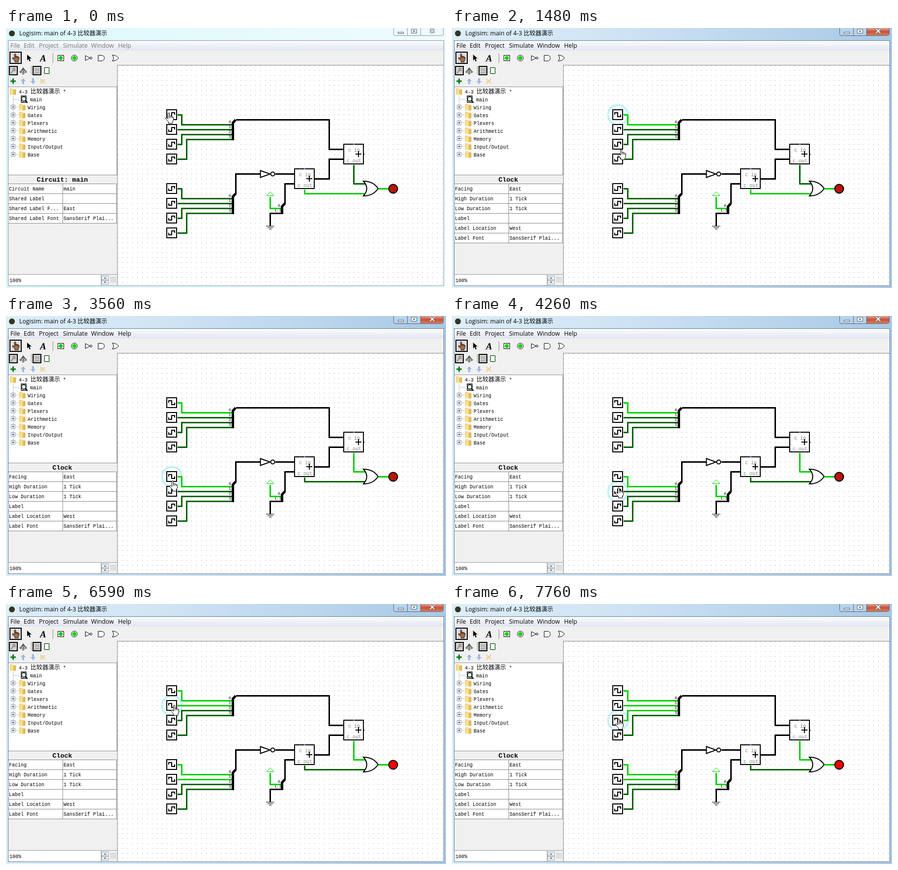
An HTML page for the animation above (8000 ms loop, 895 px wide and 528 px high).

```html
<!DOCTYPE html>
<html lang="zh">
<head>
<meta charset="utf-8">
<title>4-3 比较器演示</title>
<style>
  html, body { margin: 0; width: 100%; height: 100%; overflow: hidden; background: #f0f0f0; }
  svg { display: block; }
  text { white-space: pre; }
  .ui { font: 12.3px "Open Sans", "Noto Sans CJK SC", "Noto Sans CJK", sans-serif; }
  .cjk { font: 12px "Noto Sans CJK SC", "Noto Sans CJK", sans-serif; }
  .mono { font: 10px "Liberation Mono", monospace; }
  .head { font: bold 13.33px "Liberation Mono", monospace; text-anchor: middle; }
  .tiny { font: 8px "Liberation Mono", monospace; }
  .pin { font: 10px "Liberation Mono", monospace; fill: #808080; }
  .tool { font: italic bold 19px "Liberation Serif", serif; }
  .crisp { shape-rendering: crispEdges; }
  .line { fill: none; stroke: #000; }
</style>
</head>
<body>
<svg id="stage" width="895" height="528" viewBox="0 0 895 528"></svg>
<script>
const LOOP = 8000, ON = '#00d200', OFF = '#006400';

const text = (x, y, s, cls, fill = '#000') => `<text x="${x}" y="${y}" class="${cls}" fill="${fill}">${s}</text>`;
const rect = (x, y, w, h, fill, stroke = 'none', sw = 1) =>
  `<rect x="${x}" y="${y}" width="${w}" height="${h}" fill="${fill}" stroke="${stroke}" stroke-width="${sw}"/>`;
const path = (d, stroke = '#000', sw = 1, fill = 'none', extra = '') =>
  `<path d="${d}" stroke="${stroke}" stroke-width="${sw}" fill="${fill}" ${extra}/>`;
const crisp = s => `<g class="crisp">${s}</g>`;
const wire = (d, id = '', color = '#000') =>
  `<path d="${d}" class="crisp" transform="translate(.5 .5)" fill="none" stroke="${color}" stroke-width="3" ${id && `id="${id}"`}/>`;

const defs = `<defs>
  <linearGradient id="aeroOff"><stop stop-color="#dcf8fd"/><stop offset="1" stop-color="#effcfe"/></linearGradient>
  <linearGradient id="aeroOn"><stop stop-color="#dceefa"/><stop offset=".3" stop-color="#d3e6f5"/><stop offset="1" stop-color="#a9c9e6"/></linearGradient>
  <linearGradient id="menu" x2="0" y2="1"><stop stop-color="#fbfcfe"/><stop offset="1" stop-color="#e0e5f0"/></linearGradient>
  <linearGradient id="close" x2="0" y2="1"><stop stop-color="#e3a494"/><stop offset=".5" stop-color="#c8503a"/><stop offset="1" stop-color="#d8805c"/></linearGradient>
  <linearGradient id="folder"><stop stop-color="#fbe9a0"/><stop offset="1" stop-color="#e0ae3c"/></linearGradient>
  <pattern id="dots" x="227" y="76" width="10" height="10" patternUnits="userSpaceOnUse"><rect width="1" height="1" fill="#888"/></pattern>
</defs>`;

// Window frame, in its inactive and active look
function chrome(active) {
  const fill = active ? '#b7d2ea' : '#edf9fc', edge = active ? '#51677d' : '#8b9aa3';
  const glyph = active ? '#fff' : '#e9f4f7', ink = '#59636e';
  const menus = [[9, 'File'], [36, 'Edit'], [67, 'Project'], [116, 'Simulate'], [173, 'Window'], [228, 'Help']];
  return rect(0, 0, 895, 528, `url(#aero${active ? 'On' : 'Off'})`) +
    path('M788.5 -1V12Q788.5 15.5 792 15.5H886Q889.5 15.5 889.5 12V-1', edge, 1, fill) +
    (active ? path('M844 0V15H886Q889 15 889 12V0Z', 'none', 0, 'url(#close)') : '') +
    path('M816.5 0V15M843.5 0V15', edge) +
    rect(797.5, 8.5, 11, 3, glyph, ink) +
    path('M824.5 2.5H835.5V10.5H824.5ZM828.5 5.5H831.5V7.5H828.5Z', ink, 1, glyph, 'fill-rule="evenodd"') +
    path('M863 2L871 10M871 2L863 10', ink, 4) + path('M863 2L871 10M871 2L863 10', glyph, 2) +
    text(27, 15, 'Logisim: main of 4-3 <tspan class="cjk">比较器演示</tspan>', 'ui') +
    rect(4.5, 25.5, 886, 498, '#f0f0f0', active ? '#66798c' : '#87949b') +
    rect(5, 26, 885, 20, 'url(#menu)') +
    menus.map(([x, s]) => text(x, 40, s, 'ui', active ? '#000' : '#787878')).join('');
}

function attributes(title, rows) {
  const bottom = 316.5 + rows.length * 20;
  return text(114.5, 312, title, 'head') + crisp(rect(5, 316, 220, bottom - 316, '#fff') +
    rows.map((_, i) => path(`M5 ${316.5 + i * 20}H225`, '#888')).join('') +
    path(`M5 ${bottom}H225M115.5 316V${bottom}M224.5 316V${bottom}`, '#888')) +
    rows.map(([k, v], i) => text(6, 330 + i * 20, k, 'mono') + text(117, 330 + i * 20, v, 'mono')).join('');
}

const folder = (x, y) => path(`M${x} ${y - 6}H${x + 5}L${x + 7} ${y - 4}H${x + 12}V${y + 6}H${x}Z`, '#d9b04e', .7, 'url(#folder)') +
  path(`M${x + 5} ${y - 5}V${y + 7}L${x + 1} ${y + 5}`, '#fff3bd', 1.4);

const orGate = (x, y, w, h, sw) => path(
  `M${x} ${y - h}Q${x + w * .66} ${y - h} ${x + w} ${y}Q${x + w * .66} ${y + h} ${x} ${y + h}Q${x + w * .45} ${y} ${x} ${y - h}Z`, '#000', sw, '#fff');

const HAND = 'M5.5 12.5V2Q5.5 .5 7 .5T8.5 2V7Q10 5.6 11.5 7.2Q13.2 6.3 14.3 8.3Q16.5 8.3 16.5 10.5V15L14.5 18.5V21.5H6.5V18.5L1.5 13.2Q-.3 10.6 1.5 10Q3 9.8 5.5 12.5Z';
const hand = fill => path(HAND, '#000', 1, fill) + path('M8.5 6V11M11.5 7V11M14.5 8.5V11');

function toolbar() {
  return crisp(rect(8, 49, 23, 23, '#dcdcdc', '#000', 2) + path('M95.5 51V71M51.5 77V95', '#888') +
      rect(105.5, 55.5, 12, 11, '#fff', '#000') + rect(7, 78, 16, 17, '#d4d4d4', '#000', 2) + rect(55, 78, 16, 17, '#d4d4d4', '#000', 2)) +
    `<g transform="translate(12.5 52) scale(.86 .8)">${hand('#a86a42')}</g>` +
    path('M43 54V66L46 63L48 68L50 67L48 62H52Z', 'none', 0, '#000') + text(69, 68, 'A', 'tool') +
    `<circle cx="111.5" cy="61" r="4" fill="${ON}"/><circle cx="139" cy="61" r="6" fill="#fff" stroke="#000"/><circle cx="139" cy="61" r="4" fill="${ON}"/>` +
    path('M161.5 56V66L171 61Z', '#000', 1, '#fff') + '<circle cx="173" cy="61" r="2" fill="#fff" stroke="#000"/>' +
    path('M187.5 55.5H194Q200 56 200 61T194 67H187.5Z', '#000', 1, '#fff') + orGate(216, 61, 13, 6, 1) +
    path('M10 92L16 85M15 81Q13 87 20 86M19 81L17 84', '#909090', 2.5) +
    path('M30 88L35 81L40 88M35 83V91', '#222', 1.2) + [[30, 89], [35, 86], [40, 89], [35, 92]].map(([x, y]) => `<circle cx="${x}" cy="${y}" r="1.8" fill="#bfe8bf" stroke="#222"/>`).join('') +
    crisp(path('M58.5 82.5H62.5V86.5H58.5ZM58.5 89.5H62.5V92.5H58.5ZM65.5 82.5H68.5V91.5H65.5ZM62 84.5H65M62 90.5H65', '#999') +
      rect(78.5, 80.5, 9, 12, '#fff', '#000') + path('M77 83H79M77 90H79M87 83H89M87 90H89', ON, 2)) +
    path('M9 108H20M14.5 102.5V113.5', '#087a20', 3) +
    path('M35 102L40 108H37V114H33V108H30Z', 'none', 0, '#9db8e6') + path('M55 114L60 108H57V102H53V108H50Z', 'none', 0, '#9db8e6') +
    path('M70 104L79 112M79 104L70 112', '#efd28c', 3);
}

function sidebar() {
  const libraries = ['Wiring', 'Gates', 'Plexers', 'Arithmetic', 'Memory', 'Input/Output', 'Base'];
  return crisp(rect(5, 119, 221, 180, '#fff') + path('M5 119.5H226M5 298.5H226M225.5 119V299', '#8a8f96') +
      path('M14.5 137V257M14 145.5H28', '#888', 1, 'none', 'stroke-dasharray="1 1"')) +
    folder(8, 129) + text(26, 133, '4-3 ', 'mono') + text(50, 133, '比较器演示', 'cjk') + text(116, 133, '*', 'mono') +
    path('M31 138H41V151H31Z', '#000', 1.3, '#fff') + '<circle cx="36" cy="144" r="4.5" fill="#d9f2e0" stroke="#000" stroke-width="1.4"/>' +
    path('M39 147L44 152', '#000', 2) + text(49, 149, 'main', 'mono') +
    libraries.map((name, i) => {
      const y = 161 + 16 * i;
      return crisp(path(`M18 ${y - .5}H26`, '#888', 1, 'none', 'stroke-dasharray="1 1"') + rect(10.5, y - 4.5, 8, 8, '#fff', '#8a96a5') +
        path(`M12 ${y - .5}H17M14.5 ${y - 3}V${y + 2}`, '#24428a')) + folder(27, y) + text(44, y + 4, name, 'mono');
    }).join('') +
    crisp(rect(5, 501, 188, 22, '#fff') + path('M5 500.5H226M193.5 501V523', '#999') +
      rect(194.5, 503.5, 14, 8, '#e8edf3', '#a4adb8') + rect(194.5, 512.5, 14, 8, '#e8edf3', '#a4adb8')) +
    path('M199 509L201.5 506L204 509Z M199 515L201.5 518L204 515Z', 'none', 0, '#4b617c') + text(7, 516, '100%', 'mono') +
    [...Array(16)].map((_, i) => rect(213 + i % 4 * 3, 506 + (i >> 2) * 3, 1, 1, '#555')).join('');
}

function adder(x, y) {
  return rect(x - 20, y - 20, 40, 40, '#fff', '#000', 2) + rect(x - 1, y - 21, 3, 2, '#3355cc') +
    rect(x + 19, y - 1, 3, 3, '#000') + text(x - 11, y - 5, 'c in', 'pin') + text(x - 14, y + 17, 'c out', 'pin') +
    path(`M${x + 4} ${y}H${x + 16}M${x + 10} ${y - 6}V${y + 6}`, '#000', 2);
}

const splitter = (x, top, bottom) => path(`M${x + 5.5} ${top}L${x} ${top + 6}V${bottom}`, '#000', 5);

function clockBank(name, y) {
  const routes = [`M348 ${y}H357V${y + 20}H459`, `M348 ${y + 30}H459`, `M348 ${y + 60}H357V${y + 40}H459`, `M348 ${y + 90}H367V${y + 50}H459`];
  return routes.map((d, i) => wire(d, `wire${name}${i}`) + rect(327, y - 10 + 30 * i, 20, 20, '#fff', '#000', 2) +
      `<path id="clock${name}${i}" class="line" stroke-width="2"/>` + text(453, y + 17 + 10 * i, i, 'tiny')).join('') +
    splitter(461.5, y + 10.5, y + 52);
}

const circuit = () =>
  wire('M467 186H657V246H687') + wire('M467 337V296H517') + wire('M547 296H587') + wire('M587 316H567V357') +
  wire('M627 306H657V266H687') + wire('M559 366H537V342', '', ON) + wire('M559 376H537V402') +
  wire('M707 277V316H731', 'upper') + wire('M607 327V336H731', 'lower') + wire('M757 326H778', 'result') +
  clockBank('A', 176) + clockBank('B', 326) + splitter(561.5, 356.5, 378) +
  text(553, 363, '0', 'tiny') + text(546, 373, '1-3', 'tiny') +
  path('M537.5 332.5L545 340.5H530Z', ON, 1, '#fff') + crisp(path('M529 402.5H546M532 405.5H543M535 408.5H540')) +
  path('M517.5 289.5V303.5L537 296.5Z', '#000', 2, '#fff') + '<circle cx="542.5" cy="296.5" r="4" fill="#fff" stroke="#000" stroke-width="2"/>' +
  adder(607, 306) + adder(707, 256) + orGate(727, 326, 30, 15, 2) +
  '<circle id="led" cx="787.5" cy="326.5" r="9" stroke="#000" stroke-width="2"/>';

const circuitRows = [['Circuit Name', 'main'], ['Shared Label', ''], ['Shared Label F...', 'East'], ['Shared Label Font', 'SansSerif Plai...']];
const clockRows = [['Facing', 'East'], ['High Duration', '1 Tick'], ['Low Duration', '1 Tick'], ['Label', ''], ['Label Location', 'West'], ['Label Font', 'SansSerif Plai...']];

document.getElementById('stage').innerHTML = defs +
  `<g id="inactive">${chrome(false)}${attributes('Circuit: main', circuitRows)}</g>` +
  `<g id="active">${chrome(true)}${attributes('Clock', clockRows)}</g>` +
  '<circle cx="12" cy="11" r="6" fill="#33361f"/>' + toolbar() + sidebar() +
  crisp(rect(227, 76, 663, 447, '#fff') + rect(227, 76, 663, 447, 'url(#dots)') + path('M226.5 523V75.5H890', '#8a8f96')) +
  '<circle id="ring" cx="337.5" r="20" fill="none" stroke="#bff3f7" stroke-width="4"/>' + circuit() +
  `<g id="pointer">${hand('#fff')}</g>`;

const el = id => document.getElementById(id);
const set = (id, name, value) => el(id).setAttribute(name, value);

const switchOn = { A0: 550, A1: 5890, A2: 7760, B0: 2480, B1: 4490 };
const rings = [[320, 176], [2250, 326], [4260, 356], [5740, 206], [7690, 236]];
// start, end, steps, target x, target y, sideways bulge
const moves = [
  [1160, 1850, 10, 332, 319, 9], [3470, 3640, 3, 332, 339, 0], [3790, 3960, 3, 332, 348, 0],
  [4960, 5510, 8, 335, 204, 17], [6590, 7310, 10, 332, 232, 0], [7460, 7460, 1, 332, 233, 0],
];

function pointerAt(t) {
  let x = 324, y = 172;
  for (const [start, end, steps, tx, ty, bulge] of moves) {
    if (t < start) break;
    const gap = (end - start) / (steps - 1) || 1;
    const p = Math.min(1, (Math.floor((t - start) / gap + 1e-6) + 1) / steps);
    const eased = p * p * (3 - 2 * p);
    x += (tx - x) * eased + bulge * Math.sin(Math.PI * eased);
    y += (ty - y) * eased;
  }
  return [Math.round(x), Math.round(y)];
}

function draw(t) {
  set('inactive', 'visibility', t < 320 ? 'visible' : 'hidden');
  set('active', 'visibility', t < 320 ? 'hidden' : 'visible');

  for (const [bank, top] of [['A', 176], ['B', 326]]) for (let i = 0; i < 4; i++) {
    const name = bank + i, high = t >= switchOn[name], y = top + 30 * i, a = high ? -4 : 4;
    set('wire' + name, 'stroke', high ? ON : OFF);
    set('clock' + name, 'stroke', high ? ON : OFF);
    set('clock' + name, 'd', `M331 ${y}V${y + a}H337V${y - a}H343V${y}`);
  }

  const equal = t >= 4490 && t < 5890;
  set('upper', 'stroke', t >= 2480 && !equal ? ON : OFF);
  set('lower', 'stroke', t < 2480 ? ON : OFF);
  set('result', 'stroke', equal ? OFF : ON);
  set('led', 'fill', equal ? '#404040' : t < 4490 ? '#b81408' : '#f00000');

  const ring = rings.filter(([start]) => t >= start).pop();
  set('ring', 'visibility', ring ? 'visible' : 'hidden');
  if (ring) set('ring', 'cy', ring[1] + .5);
  set('pointer', 'transform', `translate(${pointerAt(t)})`);
}

function frame() {
  draw(performance.now() % LOOP);
  requestAnimationFrame(frame);
}
frame();
</script>
</body>
</html>
```
